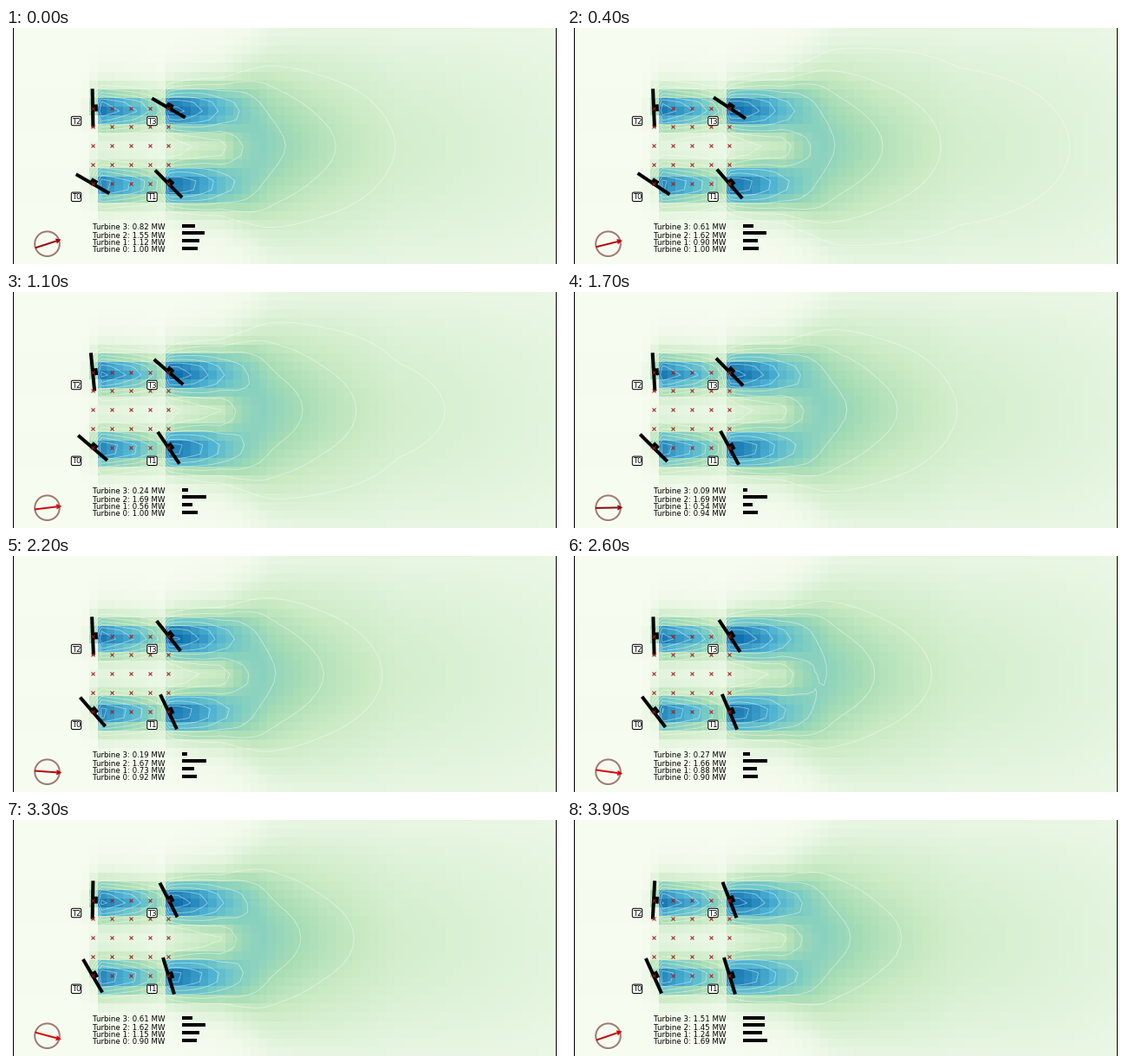
Recreate the animation shown at these times as a matplotlib script. Size 640 px wide and 273 px high, loop 4 s.

```python
import numpy as np
import matplotlib.pyplot as plt
from matplotlib.animation import FuncAnimation
from matplotlib.patches import Circle, FancyBboxPatch, Polygon

W, H, DPI = 640, 273, 100
PX = 72 / DPI            # points per pixel
FRAMES, INTERVAL = 40, 100
COLS, ROWS = 64, 27
LEFT, RIGHT = 7.5, 633.5
HUBS = [(100, 180.3), (187.5, 180.3), (100, 92.5), (187.5, 92.5)]

# Rotor tilt from vertical in degrees and power in MW, per turbine
TIMES = [0, 7, 11, 17, 26, 33, 39]
TILT = [
    [60, 53.4, 49.3, 45, 37.4, 30, 24.2],
    [44.5, 38.5, 34.2, 28.3, 23, 17, 17],
    [1, 3.5, 5.5, 3.5, 1.5, -1, -3],
    [60, 54, 49, 44.5, 33.5, 27, 21.2],
]
POWER_TIMES = [0, 7, 11, 17, 26, 33, 37, 38, 39]
POWER = [
    [1.00, 1.00, 1.00, 0.94, 0.90, 0.90, 0.90, 1.69, 1.69],
    [1.12, 0.74, 0.56, 0.54, 0.88, 1.15, 1.14, 1.22, 1.24],
    [1.55, 1.67, 1.69, 1.69, 1.66, 1.62, 1.56, 1.44, 1.45],
    [0.82, 0.45, 0.24, 0.09, 0.27, 0.61, 0.85, 1.53, 1.51],
]
CONTOUR_TIP = [449, 418, 404, 381, 355, 340, 327]
ARROW_RED = [0.60, 0.82, 0.82, 0.55, 0.84, 0.84, 0.78]


def wind_angle(n):
    return 18 - n if n < 38 else 58 - n


def wake_field(x, y):
    """Velocity deficit of both turbine rows on the cell grid."""
    peak = np.interp(
        x,
        [0, 85, 92, 98, 108, 125, 150, 180, 186, 200, 225, 250,
         280, 310, 360, 450, 640],
        [.01, .01, .06, .3, .82, .74, .62, .4, .86, .84, .72, .58,
         .47, .38, .30, .19, .10])
    spread = np.interp(x, [183, 250, 280, 310, 450, 640],
                       [15.5, 24, 35, 50, 80, 120])
    top, bottom = 94.5, 181.5

    def pair(s):
        def bell(d):
            return np.exp(-0.5 * (np.abs(d) / s) ** 2.2)
        total = bell(y[:, None] - top) + 0.96 * bell(y[:, None] - bottom)
        return total / (1 + bell(bottom - top))

    field = peak * (0.8 * pair(spread) + 0.2 * pair(1.9 * spread))
    # the cells just ahead of the first rotors are hit on the upper half only
    behind = ((y > 101) & (y < 136)) | (y > 182)
    field[behind, 9] *= 0.25
    return field


cell_x = LEFT + (np.arange(COLS) + 0.5) * (RIGHT - LEFT) / COLS
cell_y = (np.arange(ROWS) + 0.5) * H / ROWS
field = wake_field(cell_x, cell_y)
mid_row = field[ROWS // 2]

fig = plt.figure(figsize=(W / DPI, H / DPI), dpi=DPI, facecolor="white")
ax = fig.add_axes([0, 0, 1, 1])
ax.imshow(field, cmap="GnBu", vmin=0, vmax=1, interpolation="nearest",
          extent=(LEFT, RIGHT, H, 0), aspect="auto", zorder=0)
ax.set_xlim(0, W)
ax.set_ylim(H, 0)
ax.axis("off")
plt.rcParams["font.family"] = "DejaVu Sans"


def stroke(color="black", width=4, z=4):
    return ax.plot([], [], color=color, lw=width * PX,
                   solid_capstyle="butt", zorder=z)[0]


for edge in (LEFT, RIGHT):
    ax.plot([edge, edge], [0, H], color="black", lw=PX, zorder=3)

grid_x, grid_y = np.meshgrid(np.linspace(100.3, 187.3, 5),
                             np.linspace(92.5, 180.3, 5))
ax.plot(grid_x.ravel(), grid_y.ravel(), "x", color="#a51a1a",
        ms=4 * PX, mew=1 * PX, zorder=6)

rotors = [stroke() for _ in HUBS]
nacelles = [stroke(width=8) for _ in HUBS]

for i, (hx, hy) in enumerate(HUBS):
    cx, cy = hx - 19, hy + 15
    ax.add_patch(FancyBboxPatch(
        (cx - 4, cy - 3.5), 8, 7, boxstyle="round,pad=1.7,rounding_size=1.7",
        fc="white", ec="black", lw=PX, zorder=7))
    ax.text(cx, cy + 3.2, f"T{i}", fontsize=8.5 * PX, ha="center",
            va="baseline", zorder=8)

BASELINES = [259.3, 251.2, 242.7, 233.2]
BAR_Y = [255, 246, 237, 229]
labels = [ax.text(100, y, "", fontsize=8.7 * PX, va="baseline", zorder=8)
          for y in BASELINES]
bars = [stroke() for _ in BAR_Y]

ax.add_patch(Circle((47.5, 249.7), 14.3, fill=False, ec="#a07a72",
                    lw=2 * PX, zorder=4))
shaft = stroke(width=2, z=5)
head = ax.add_patch(Polygon([(0, 0)] * 3, closed=True, lw=0, zorder=5))
contours = []


def draw_contours(n):
    while contours:
        contours.pop().remove()
    tip = np.interp(n, TIMES, CONTOUR_TIP)
    levels = np.interp(tip, cell_x, mid_row) + 0.1 * np.arange(-1, 7)
    levels = levels[(levels > 0.13) & (levels < 0.9)]
    contours.append(ax.contour(cell_x, cell_y, field, levels=levels,
                               colors="white", alpha=0.45,
                               linewidths=0.9 * PX, zorder=2))


def draw_compass(n):
    a = np.radians(wind_angle(n))
    along = np.array([np.cos(a), -np.sin(a)])
    side = np.array([np.sin(a), np.cos(a)])
    hub = np.array([48.3, 249.6])
    tail, neck, tip = hub - 15.3 * along, hub + 10 * along, hub + 16 * along
    red = np.interp(n, TIMES, ARROW_RED)
    color = (red, 0.03, 0.04)
    shaft.set_data(*zip(tail, neck))
    shaft.set_color(color)
    head.set_xy([neck + 3.2 * side, tip, neck - 3.2 * side])
    head.set_facecolor(color)


def update(n):
    draw_contours(n)
    draw_compass(n)
    for i, (hx, hy) in enumerate(HUBS):
        t = np.radians(np.interp(n, TIMES, TILT[i]))
        sx, sy = 22.2 * np.sin(t), 22.2 * np.cos(t)
        rotors[i].set_data([hx - sx, hx + sx], [hy - sy, hy + sy])
        nacelles[i].set_data([hx, hx + 5.8 * np.cos(t)],
                             [hy, hy - 5.8 * np.sin(t)])
        power = np.interp(n, POWER_TIMES, POWER[i])
        labels[i].set_text(f"Turbine {i}: {power:.2f} MW")
        bars[i].set_data([203, 206.6 + 14.5 * power], [BAR_Y[i]] * 2)
    return []


anim = FuncAnimation(fig, update, frames=FRAMES, interval=INTERVAL,
                     init_func=lambda: [], repeat=True, repeat_delay=0,
                     blit=False)
plt.show()
```
